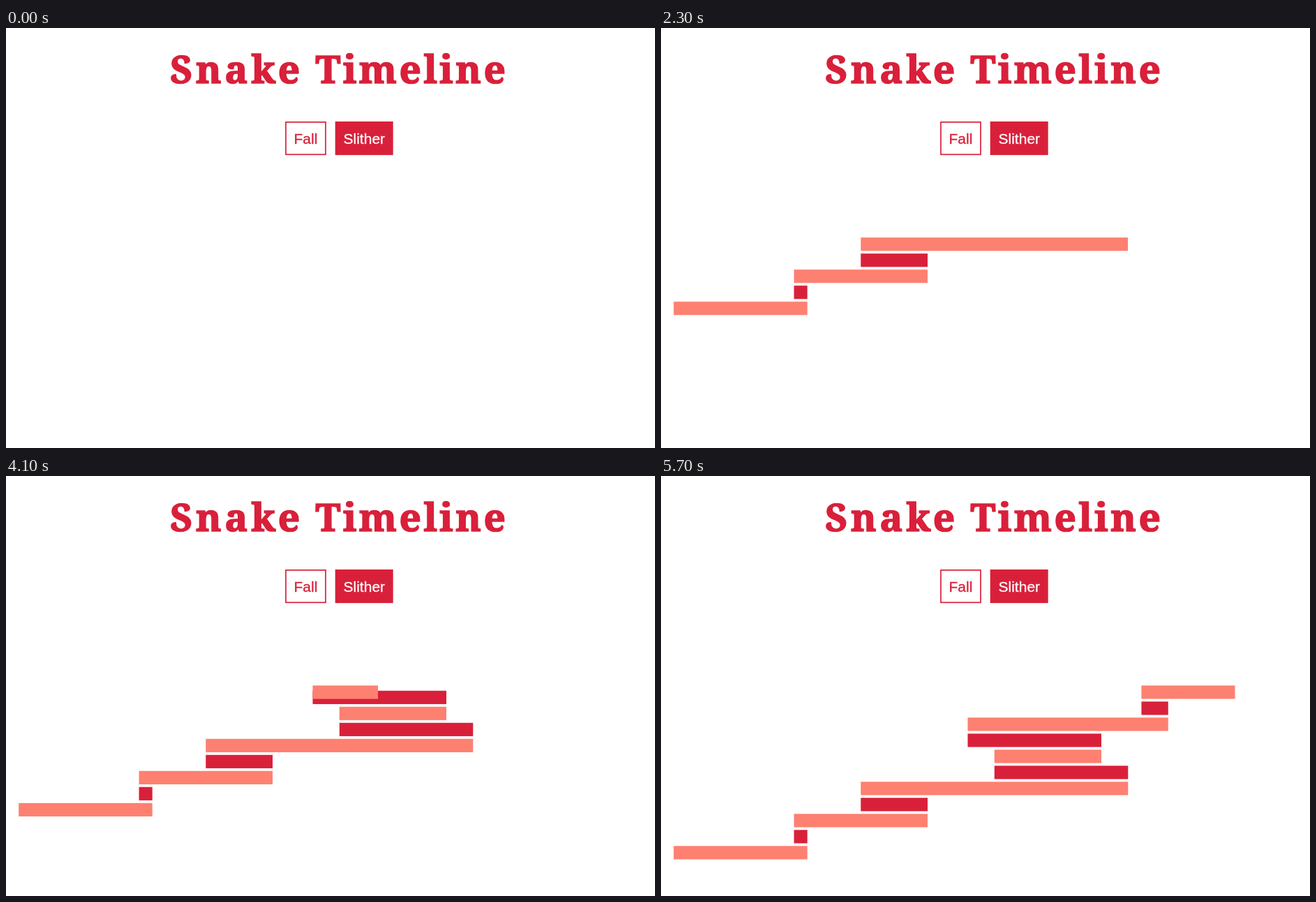
Animation of 930x602 px, one loop 6000 ms. Source, as an HTML page:

```html
<!DOCTYPE html>
<html lang="en">
<head>
<meta charset="utf-8">
<title>Snake Timeline</title>
<style>
  html, body { margin: 0; width: 100%; height: 100%; overflow: hidden; background: #fff; }
  svg { display: block; width: 930px; height: 602px; }
  .title { font: 700 55px "Noto Serif", serif; fill: #d9203a; stroke: #d9203a; stroke-width: 1.6px; }
  .label { font: 21px "Liberation Sans", Arial, sans-serif; text-anchor: middle; stroke-width: .3px; }
</style>
</head>
<body>
<svg viewBox="0 0 930 602">
  <text class="title" y="78.6"><tspan x="235.2" letter-spacing="4.7">Snake</tspan> <tspan x="443.6" letter-spacing="3.5">Timeline</tspan></text>
  <rect x="401" y="134.9" width="57" height="46.4" fill="#fff" stroke="#d9203a" stroke-width="1.7"/>
  <text class="label" x="429.4" y="165.6" fill="#d9203a" stroke="#d9203a">Fall</text>
  <rect x="471.7" y="134" width="83" height="48.1" fill="#d9203a"/>
  <text class="label" x="513.3" y="165.6" fill="#fff" stroke="#fff">Slither</text>
  <g id="bars"></g>
</svg>
<script>
const LOOP = 6000, TICK = 100;
const START = 35, PER_YEAR = 50, GAP = 5;
const LEFT = 18.2, YEAR = 19.15, TOP = 300.3, ROW = 23, HEIGHT = 19.15;
const COLORS = ["#fd8071", "#d9203a"];

// First and last year of each bar; even bars grow rightwards, odd ones leftwards.
const spans = [[0, 10], [9, 10], [9, 19], [14, 19], [14, 34], [24, 34],
               [24, 32], [22, 32], [22, 37], [35, 37], [35, 42]];

const group = document.getElementById("bars");
let clock = START;
const bars = spans.map(([from, to], i) => {
  const el = document.createElementNS("http://www.w3.org/2000/svg", "rect");
  el.setAttribute("height", HEIGHT);
  el.setAttribute("fill", COLORS[i % 2]);
  group.append(el);
  const bar = { el, from, to, leftward: i % 2 === 1, begin: clock, duration: (to - from) * PER_YEAR };
  clock += bar.duration + GAP;
  return bar;
});

const cubicInOut = u => u < .5 ? 4 * u ** 3 : 1 - 4 * (1 - u) ** 3;
const progress = (bar, t) => cubicInOut(Math.min(1, Math.max(0, (t - bar.begin) / bar.duration)));

function draw(t) {
  let push = 0; // rows by which newer bars have moved this one down
  for (let i = bars.length - 1; i >= 0; i--) {
    const bar = bars[i], p = progress(bar, t);
    const width = (bar.to - bar.from) * YEAR * p;
    const x = LEFT + (bar.leftward ? bar.to * YEAR - width : bar.from * YEAR);
    bar.el.setAttribute("x", x);
    bar.el.setAttribute("y", TOP + push * ROW);
    bar.el.setAttribute("width", width);
    push += p;
  }
}

function frame() {
  const t = performance.now() % LOOP;
  draw(Math.floor(t / TICK) * TICK);
  requestAnimationFrame(frame);
}
frame();
</script>
</body>
</html>
```
